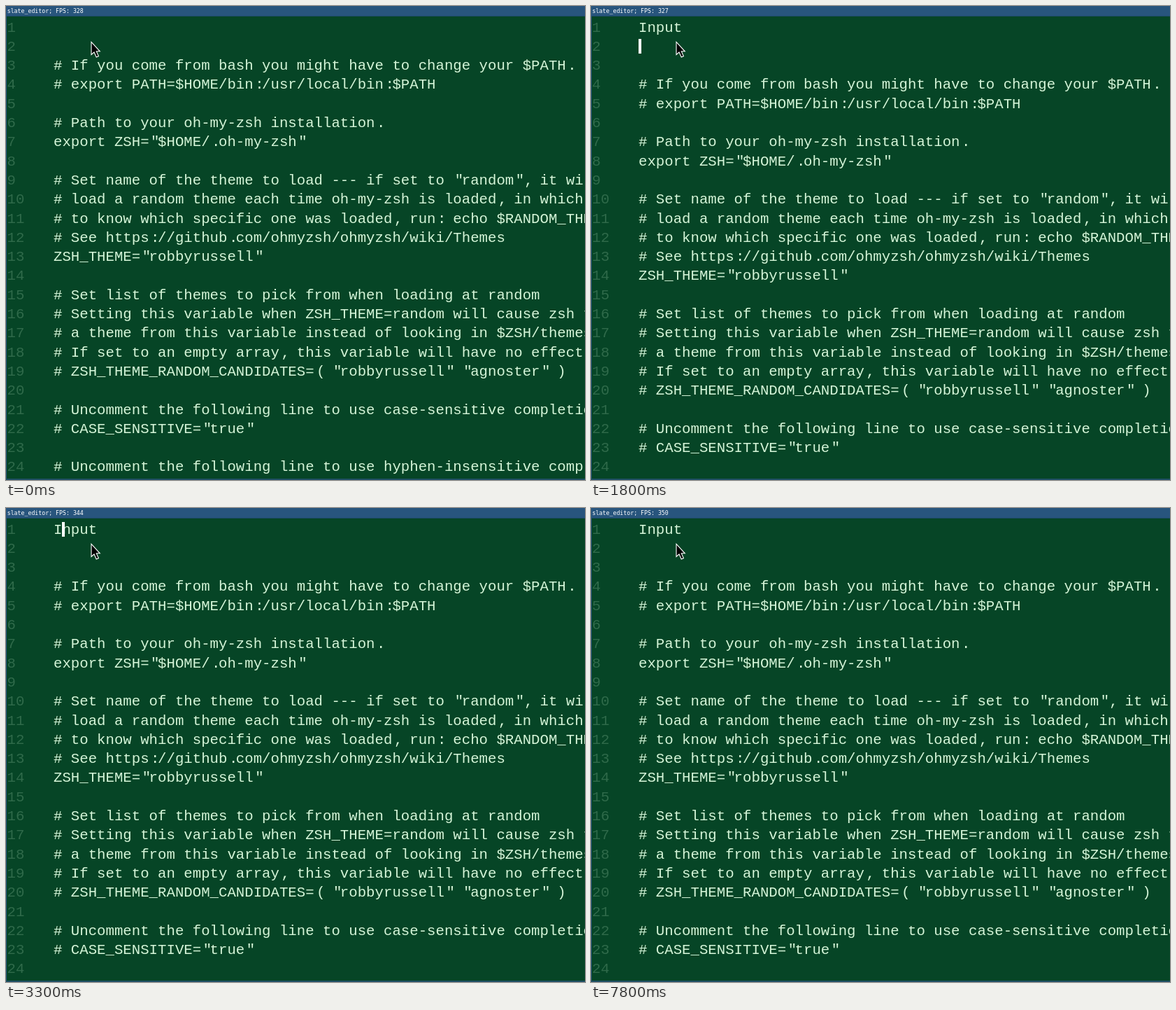
These frames come from a looping animation (828x677 px, 8 s). An HTML page with a canvas:

```html
<!DOCTYPE html>
<html lang="en">
<meta charset="utf-8">
<title>Editor</title>
<style>
  html, body { margin: 0; width: 100%; height: 100%; overflow: hidden; background: #064526; }
  canvas { display: block; }
</style>
<canvas id="stage" width="828" height="677"></canvas>
<script>
const ctx = document.getElementById('stage').getContext('2d');
const STEP = 100, BLINK = 400, LEFT = 68, CHAR = 12.42, ROW = 27.3, ROWS = 24;

const page = `

# If you come from bash you might have to change your $PATH.
# export PATH=$HOME/bin:/usr/local/bin:$PATH

# Path to your oh-my-zsh installation.
export ZSH="$HOME/.oh-my-zsh"

# Set name of the theme to load --- if set to "random", it will
# load a random theme each time oh-my-zsh is loaded, in which case,
# to know which specific one was loaded, run: echo $RANDOM_THEME
# See https://github.com/ohmyzsh/ohmyzsh/wiki/Themes
ZSH_THEME="robbyrussell"

# Set list of themes to pick from when loading at random
# Setting this variable when ZSH_THEME=random will cause zsh to load
# a theme from this variable instead of looking in $ZSH/themes/
# If set to an empty array, this variable will have no effect.
# ZSH_THEME_RANDOM_CANDIDATES=( "robbyrussell" "agnoster" )

# Uncomment the following line to use case-sensitive completion.
# CASE_SENSITIVE="true"

# Uncomment the following line to use hyphen-insensitive completion.`;

// One key per step, one second per row; · is a pause, » is a held right arrow.
const keys = [
  '··↑↑··↑···',
  'I·n·put·⏎·',
  '··↑→······',
  '·⏎⌫·····→→',
  '→·····↓↓↓·',
  '·↓·↓·↓↓·↓·',
  '↓··→······',
  '→»»»»»»»··',
].join('');
const LOOP = keys.length * STEP;
const rates = [328, 326, 327, 345, 344, 361, 363, 362, 350];

function press(ed, key) {
  const { lines } = ed;
  const text = lines[ed.row];
  const before = text.slice(0, ed.col), after = text.slice(ed.col);
  if (key === '·') return;
  if (key === '↑' || key === '↓') {
    ed.row += key === '↑' ? -1 : 1;
    ed.col = Math.min(ed.goal, lines[ed.row].length);
    return;
  }
  if (key === '→') ed.col++;
  else if (key === '»') ed.col += 3;
  else if (key === '⏎') {
    lines.splice(ed.row++, 1, before, after);
    ed.col = 0;
  } else if (key === '⌫') {
    ed.row--;
    ed.col = lines[ed.row].length;
    lines.splice(ed.row, 2, lines[ed.row] + text);
  } else {
    lines[ed.row] = before + key + after;
    ed.col++;
  }
  ed.goal = ed.col;
}

function editorAt(t) {
  const ed = { lines: page.split('\n'), row: 3, col: 0, goal: 0 };
  for (const key of keys.slice(0, Math.floor(t / STEP) + 1)) press(ed, key);
  return ed;
}

const nudge = c => c === '(' ? 3.5 : '.,:"'.includes(c) ? 2.5 : 0;

function write(text, color, x, y) {
  ctx.fillStyle = color;
  [...text].forEach((c, i) => ctx.fillText(c, x + i * CHAR + nudge(c), y));
}

function box(color, x, y, w, h) {
  ctx.fillStyle = color;
  ctx.fillRect(x, y, w, h);
}

function drawPointer() {
  const p = new Path2D('M122 51.5V69.5L126 66L129.2 73L132.4 71.6L129.3 64.8H134.3Z');
  ctx.fillStyle = '#000';
  ctx.fill(p);
  ctx.strokeStyle = '#fff';
  ctx.lineWidth = 1.1;
  ctx.stroke(p);
}

function draw(t) {
  const ed = editorAt(t);
  box('#064526', 0, 0, 828, 677);

  ctx.font = '20.7px "Liberation Mono", monospace';
  for (let i = 0; i < ROWS; i++) {
    const y = 37 + Math.floor(i * ROW);
    write(String(i + 1), '#2f6a4a', 1.5, y);
    write(ed.lines[i], '#d5f5d8', LEFT, y);
  }

  const lit = Math.floor((t + 300) / BLINK) % 2;
  if (lit) box('#fff', Math.floor(LEFT + ed.col * CHAR), 20 + Math.floor(ed.row * ROW), 4, 21);

  box('#28557d', 0, 0, 828, 14);
  box('#1d4a66', 0, 14, 828, 1);
  box('#28557d', 0, 14, 1, 663);
  box('#1f4f63', 0, 675, 828, 2);
  ctx.font = '8.24px "DejaVu Sans Mono", monospace';
  ctx.fillStyle = '#fff';
  ctx.fillText(`slate_editor; FPS: ${rates[Math.floor((t + 920) / 1020)]}`, 1.7, 10);
  drawPointer();
}

function tick(now) {
  draw(now % LOOP);
  requestAnimationFrame(tick);
}
requestAnimationFrame(tick);
</script>
</html>
```
